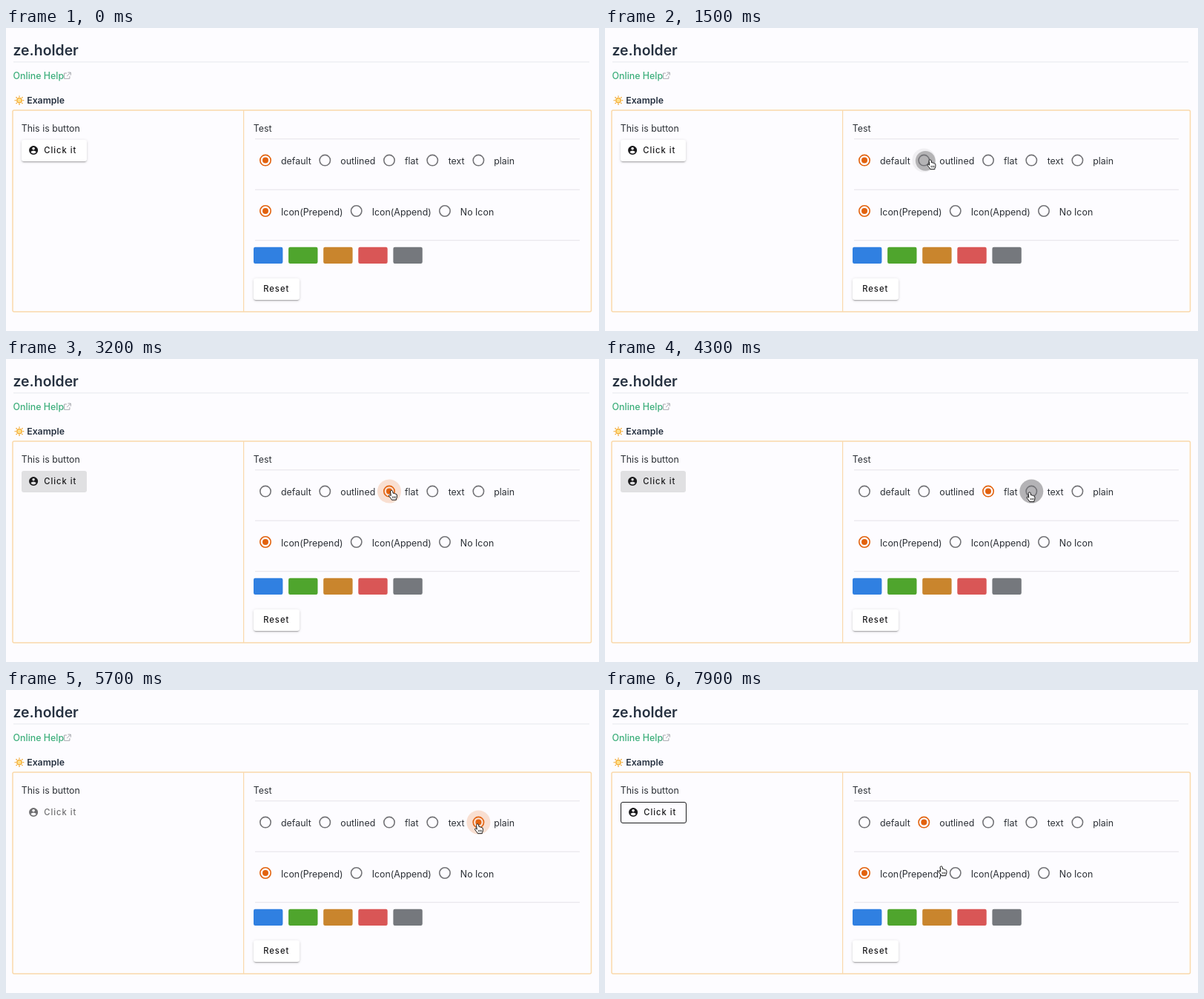
Animation of 800 by 409 pixels, one loop 8 s. Source, as an HTML page:

```html
<!DOCTYPE html>
<html lang="en">
<head>
<meta charset="utf-8">
<title>Button demo</title>
<style>
html, body { margin: 0; width: 100%; height: 100%; overflow: hidden; background: #fdfcff; }
svg { position: absolute; left: 0; top: 0; font: 12.4px Inter, "Open Sans", sans-serif; fill: #2c3036; }
.btn { position: absolute; box-sizing: border-box; height: 28.5px; border-radius: 3px; }
.raised { background: #fff; box-shadow: 0 2.4px .8px -1.6px rgba(0,0,0,.2), 0 1.6px 1.6px rgba(0,0,0,.14), 0 .8px 4px rgba(0,0,0,.12); }
.outlined { border: 1px solid #1d1d1f; }
.flat { background: #e0e0e2; }
#demo { left: 21px; top: 151px; }
#reset { left: 334px; top: 338px; width: 61.5px; }
.label { font-size: 11.2px; font-weight: 500; letter-spacing: 1px; fill: #18181a; }
.bold { font-weight: 600; fill: #263140; }
</style>
</head>
<body>
<div id="demo" class="btn"></div>
<div id="reset" class="btn raised"></div>
<svg id="stage" width="800" height="409" viewBox="0 0 800 409">
  <text class="bold" x="9.5" y="37" font-size="19.4">ze.holder</text>
  <path d="M10 45.9H787" stroke="#e6e8ec"/>
  <text x="9.6" y="68.5" font-weight="500" fill="#3eaf7c">Online Help</text>
  <path d="M82 61H78.6V68.3H85.9V65M83.4 60H87.3V63.8M87 60.3L82 65.2" fill="none" stroke="#a5a7ac"/>
  <g transform="translate(18 97.7)" stroke="#f2a52b" stroke-width="1.3">
    <circle r="3.3" fill="#ffe08a"/>
    <g id="rays"></g>
  </g>
  <text class="bold" x="28.2" y="102" font-size="12.3">Example</text>
  <rect x="9" y="111" width="780.5" height="272" rx="2" fill="none" stroke="#fad9ab" stroke-width="1.5"/>
  <path d="M320.6 111V383" stroke="#fad9ab" stroke-width="1.2"/>
  <text x="20.8" y="140">This is button</text>
  <text x="333.8" y="140">Test</text>
  <path d="M336 149.8H774M336 218.2H774M336 286.7H774" stroke="#e5e3e8"/>
  <g id="content">
    <path transform="translate(29.9 157.9) scale(.6)" fill="#18181a" fill-rule="evenodd" d="M12 2a10 10 0 1 0 .01 0zM12 5a3 3 0 1 1-.01 0zM12 19.2Q8.2 19.2 6 16C6 14 10 12.9 12 12.9S18 14 18 16Q15.8 19.2 12 19.2z"/>
    <text class="label" x="51.2" y="169.2">Click it</text>
  </g>
  <text class="label" x="347.2" y="356.3">Reset</text>
  <g id="swatches"></g>
  <g id="radios"></g>
  <g id="cursor" stroke="#111" stroke-width="1" stroke-linejoin="round">
    <path fill="#fff" d="M-2.4-6q1.4-.6 1.9.8l.7 3q1.4-.6 1.9.5q1.2-.5 1.8.6q1.5-.2 1.5 1.6v2q0 1.6-1 3v1.2h-6q-1-2-2.4-3.4L-5.3 1.6q-.6-1.3.7-1.6q.9 0 1.9 1.2L-3.4-4.5q0-1.2 1-1.5z"/>
    <path fill="none" stroke-width=".8" d="M-.4 1.8v2.6M1.5 1.8v2.6M3.3 1.8v2.6"/>
  </g>
</svg>
<script>
const LOOP = 8000, ORANGE = '#e2620e', GREY = '#737377';
const $ = id => document.getElementById(id);

function add(parent, tag, attrs, text = '') {
  const el = document.createElementNS('http://www.w3.org/2000/svg', tag);
  set(el, attrs);
  el.textContent = text;
  return parent.appendChild(el);
}
function set(el, attrs) {
  for (const k in attrs) el.setAttribute(k, attrs[k]);
}

for (let a = 0; a < 360; a += 45)
  add($('rays'), 'path', { d: 'M0-4.6V-6.3', transform: `rotate(${a})` });
['#3080e1', '#4fa52d', '#c9852d', '#d95656', '#75787d'].forEach((fill, i) =>
  add($('swatches'), 'rect', { x: 334 + 47.1 * i, y: 295.7, width: 39.4, height: 22.3, rx: 2.2, fill }));

function radio(x, y, labelX, label) {
  const g = $('radios');
  const halo = add(g, 'circle', { cx: x, cy: y, r: 16, opacity: 0 });
  const ripple = add(g, 'circle', { cx: x, cy: y, r: 0, fill: '#000' });
  const ring = add(g, 'circle', { cx: x, cy: y, r: 7.2, fill: 'none', 'stroke-width': 1.6 });
  const dot = add(g, 'circle', { cx: x, cy: y, r: 4, fill: ORANGE });
  add(g, 'text', { x: labelX, y: y + 5.5 }, label);
  const check = on => {
    set(ring, { stroke: on ? ORANGE : GREY });
    set(dot, { opacity: +on });
  };
  return { x, y, halo, ripple, check };
}

const styles = [
  [350, 371, 'default'], [430.3, 451.3, 'outlined'], [517, 538, 'flat'],
  [575.3, 596.7, 'text'], [637.4, 658.2, 'plain']
].map(([x, lx, s]) => radio(x, 178.6, lx, s));
[[350, 371, 'Icon(Prepend)'], [472.7, 493.7, 'Icon(Append)'], [592, 612.8, 'No Icon']]
  .forEach(([x, lx, s], i) => radio(x, 247, lx, s).check(!i));

const looks = ['raised', 'outlined', 'flat', '', ''];

// radio index, hover start, press, release, hover end
const visits = [
  [1, 1200, 1380, 1600, 2000],
  [2, 2300, 2400, 2600, 3950],
  [3, 4050, 4100, 4350, 4900],
  [4, 5100, 5300, 5500, 6350]
];
const clicks = [[0, 0], ...visits.map(v => [v[3], v[0]]), [7250, 1]];

// time, x, y
const path = [
  [600, 600, 430], [1250, 440.5, 184], [1900, 440.5, 184], [2350, 522, 183.5],
  [3850, 522, 183.5], [4100, 574.5, 186], [4800, 574.5, 186], [5200, 638, 187],
  [6300, 638, 187], [6850, 453, 190], [7350, 453, 190], [7800, 455.5, 244]
];

const clamp = v => Math.max(0, Math.min(1, v));
const smooth = v => v * v * (3 - 2 * v);

function cursorAt(t) {
  let i = path.findIndex(p => p[0] > t);
  if (i < 0) return path[path.length - 1].slice(1);
  if (!i) return path[0].slice(1);
  const [a, b] = [path[i - 1], path[i]];
  const k = smooth((t - a[0]) / (b[0] - a[0]));
  return [1, 2].map(n => a[n] + (b[n] - a[n]) * k);
}

function draw(t) {
  const picked = clicks.filter(c => c[0] <= t).pop()[1];
  styles.forEach((r, i) => r.check(i === picked));

  const outlined = picked === 1;
  $('demo').className = 'btn ' + looks[picked];
  $('demo').style.width = (outlined ? 89 : 87.5) + 'px';
  set($('content'), {
    opacity: picked === 4 ? .62 : 1,
    transform: `translate(${outlined ? 1 : 0} 0)`
  });

  const [x, y] = cursorAt(t);
  set($('cursor'), { transform: `translate(${x} ${y})` });

  for (const [i, enter, press, release, leave] of visits) {
    const r = styles[i], done = t >= release;
    const fade = clamp((t - enter) / 100) * clamp((leave - t) / 100);
    set(r.halo, { fill: done ? ORANGE : '#000', opacity: fade * (done ? .19 : .05) });
    const grow = clamp((t - press) / 180);
    const drift = 1 - grow;
    set(r.ripple, {
      cx: r.x + 6 * drift,
      cy: r.y + 2 * drift,
      r: t < press ? 0 : 8 + 8 * grow,
      opacity: .25 * clamp((release + 150 - t) / 150)
    });
  }
}

function tick() {
  draw(performance.now() % LOOP);
  requestAnimationFrame(tick);
}
tick();
</script>
</body>
</html>
```
